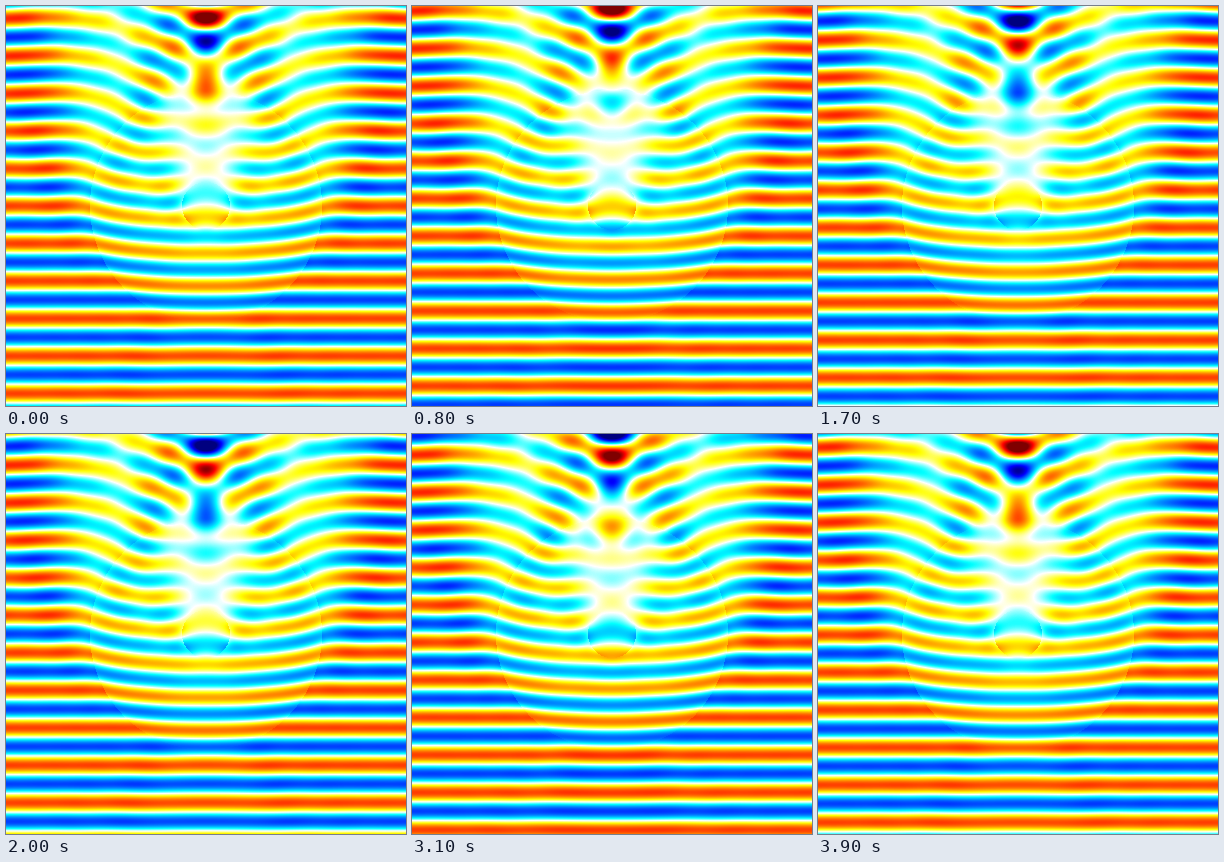
Animation, 400 px wide and 400 px high, one loop 4 s. Source, as a matplotlib script:

```python
"""Plane wave travelling upwards through a coated sphere (Mie series, E plane)."""
import numpy as np
import matplotlib.pyplot as plt
from matplotlib.animation import FuncAnimation
from matplotlib.colors import LinearSegmentedColormap

SIZE = 400
FRAMES = 40
INTERVAL = 100

WAVELENGTH = 37.5
K = 2 * np.pi / WAVELENGTH
CORE_R, SHELL_R = 24.0, 116.0
N_CORE = 0.75
N_SHELL = 1.14 + 0.038j
ORDERS = 36
V_MAX = 1.6


def spherical_bessel(z):
    """Spherical j and y, orders 0 to ORDERS, for a 1D array of arguments."""
    z = np.atleast_1d(z).astype(complex)
    mu, weight = np.polynomial.legendre.leggauss(120)
    legendre = np.polynomial.legendre.legvander(mu, ORDERS)
    turn = (-1j) ** np.arange(ORDERS + 1)
    j = ((np.exp(1j * z[:, None] * mu) * weight) @ legendre * turn / 2).T

    y = [-np.cos(z) / z, -np.cos(z) / z ** 2 - np.sin(z) / z]
    for n in range(1, ORDERS):
        y.append((2 * n + 1) / z * y[n] - y[n - 1])
    return j, np.array(y)


def slope(f, z):
    """(z f)' / z for orders 1 to ORDERS."""
    n = np.arange(1, ORDERS + 1)[:, None]
    return f[:-1] - n * f[1:] / z


def edge(index, r, electric):
    """The two quantities, for j and y, that stay continuous at radius r."""
    z = np.array([index * K * r])
    pairs = []
    for f in spherical_bessel(z):
        value, rise = f[1:, 0], slope(f, z)[:, 0]
        pairs.append((rise, index * value) if electric else (value, index * rise))
    return pairs


def match_layers(electric):
    """Coefficients (scattered, shell j, shell y, core j) for every order."""
    out_j, out_y = edge(1.0, SHELL_R, electric)
    top_j, top_y = edge(N_SHELL, SHELL_R, electric)
    low_j, low_y = edge(N_SHELL, CORE_R, electric)
    core_j, _ = edge(N_CORE, CORE_R, electric)
    result = []
    for i in range(ORDERS):
        outer = [[out_j[c][i] + 1j * out_y[c][i], -top_j[c][i], -top_y[c][i], 0]
                 for c in range(2)]
        inner = [[0, low_j[c][i], low_y[c][i], -core_j[c][i]] for c in range(2)]
        drive = [-out_j[0][i], -out_j[1][i], 0, 0]
        result.append(np.linalg.solve(np.array(outer + inner), drive))
    return np.array(result).T


def layer_field(r, theta, inner, outer, index, magnetic, electric):
    """E along x inside one layer; each coefficient pair weights j and y."""
    samples = np.linspace(inner, outer, int((outer - inner) * 4))
    z = index * K * samples
    j, y = spherical_bessel(z)

    def mix(pair, f_j, f_y):
        return pair[0][:, None] * f_j + pair[1][:, None] * f_y

    m_part = mix(magnetic, j[1:], y[1:])
    n_part = mix(electric, slope(j, z), slope(y, z))
    r_part = mix(electric, j[1:], y[1:]) / z

    cos, sin = np.cos(theta), np.sin(theta)
    total = np.zeros(r.shape, complex)
    pi_old, pi_now = np.zeros_like(r), np.ones_like(r)
    for n in range(1, ORDERS + 1):
        tau = n * cos * pi_now - (n + 1) * pi_old
        m_r, n_r, r_r = (np.interp(r, samples, part[n - 1])
                         for part in (m_part, n_part, r_part))
        e_theta = pi_now * m_r - 1j * tau * n_r
        e_r = -1j * n * (n + 1) * sin * pi_now * r_r
        scale = 1j ** n * (2 * n + 1) / (n * (n + 1))
        total += scale * (e_theta * cos + e_r * sin)
        pi_next = ((2 * n + 1) * cos * pi_now - (n + 1) * pi_old) / n
        pi_old, pi_now = pi_now, pi_next
    return total


def complex_field():
    m_out, m_j, m_y, m_core = match_layers(electric=False)
    e_out, e_j, e_y, e_core = match_layers(electric=True)
    zero = np.zeros(ORDERS)
    layers = [
        (0.3, CORE_R, N_CORE, (m_core, zero), (e_core, zero)),
        (CORE_R, SHELL_R, N_SHELL, (m_j, m_y), (e_j, e_y)),
        (SHELL_R, 290.0, 1.0, (m_out, 1j * m_out), (e_out, 1j * e_out)),
    ]
    axis = np.arange(SIZE) + 0.5 - SIZE / 2
    x, up = np.meshgrid(axis, -axis)
    r, theta = np.hypot(x, up), np.arctan2(np.abs(x), up)

    field = np.where(r >= SHELL_R, np.exp(1j * K * up), 0)
    for inner, outer, *rest in layers:
        inside = (r >= inner) & (r < outer)
        field[inside] += layer_field(r[inside], theta[inside],
                                     inner, outer, *rest)
    return field


cmap = LinearSegmentedColormap.from_list("wave", [
    (0.0, (0, 0, 0.5)), (0.125, (0, 0, 1)), (0.375, (0, 1, 1)),
    (0.5, (1, 1, 1)),
    (0.625, (1, 1, 0)), (0.875, (1, 0, 0)), (1.0, (0.5, 0, 0)),
], N=512)

FIELD = complex_field()

fig = plt.figure(figsize=(4, 4), dpi=100)
ax = fig.add_axes([0, 0, 1, 1])
ax.set_axis_off()
image = ax.imshow(FIELD.real, cmap=cmap, vmin=-V_MAX, vmax=V_MAX,
                  interpolation="nearest", aspect="auto")


def update(frame):
    phase = 2 * np.pi * frame / FRAMES
    image.set_data((FIELD * np.exp(-1j * phase)).real)
    return [image]


anim = FuncAnimation(fig, update, frames=FRAMES, interval=INTERVAL,
                     repeat=True, repeat_delay=0, blit=False)
plt.show()
```
